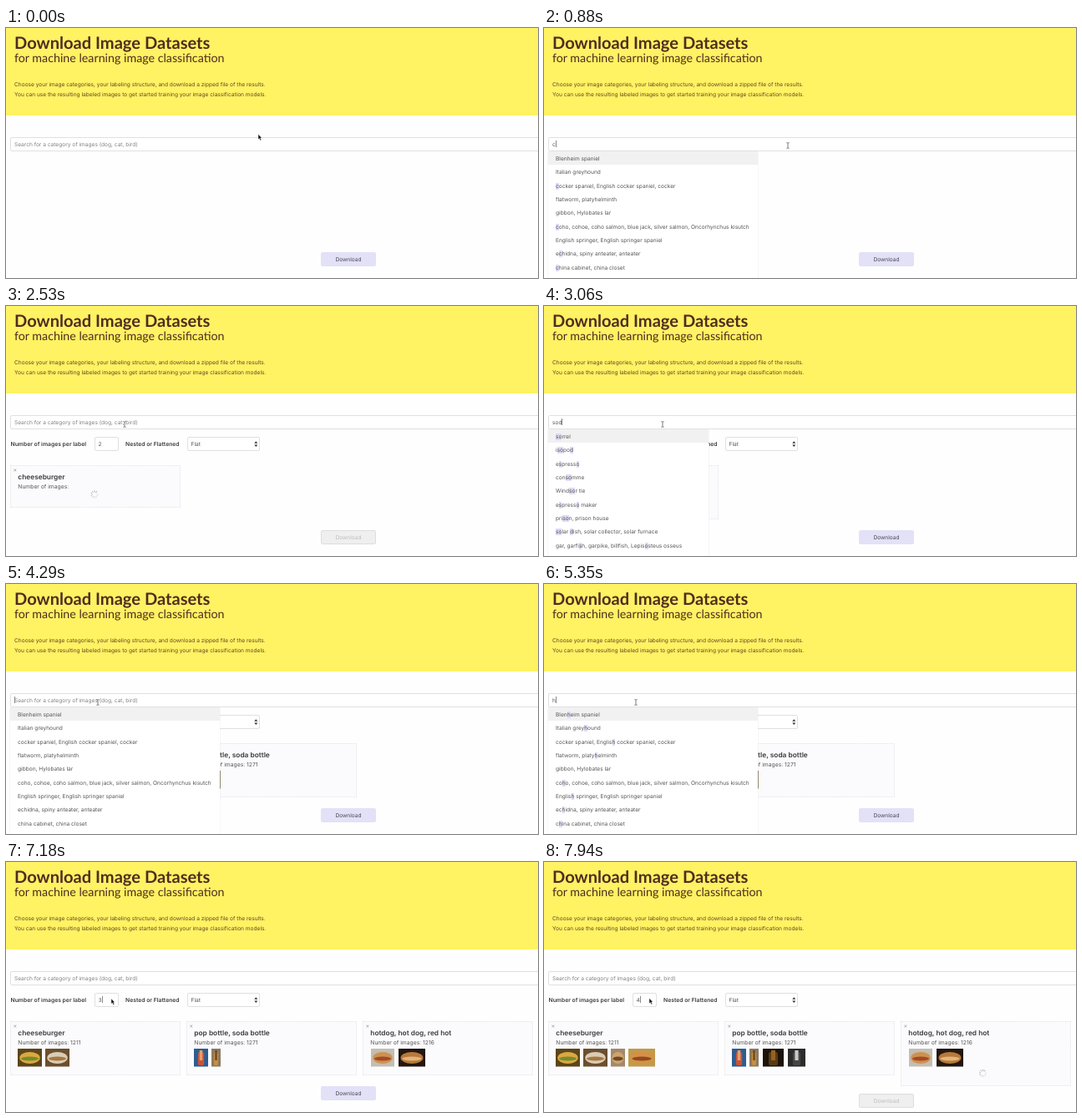
Animation of 637x300 px, one loop 8 s. Source, as an HTML page:

```html
<!DOCTYPE html>
<html lang="en">
<head>
<meta charset="utf-8">
<title>Download Image Datasets</title>
<style>
html, body { margin: 0; width: 100%; height: 100%; overflow: hidden; background: #fefefe; }
#stage { position: relative; width: 637px; height: 300px; overflow: hidden; background: #fefefe;
  font: 6.58px/16px Inter, sans-serif; color: #555; text-rendering: geometricPrecision; }
#stage div, #stage svg { position: absolute; box-sizing: border-box; white-space: pre; }
#stage svg { left: 0; top: 0; }
.head { background: #fff263; }
.field { background: #fff; border: 1px solid #e0e0e0; border-radius: 2px; }
.card { background: #fbfbfd; border: 1px dotted #e4e4e9; }
#stage .list { left: 5px; top: 148px; background: #fff; box-shadow: 0 1px 1px #ccc; }
#stage .list p { margin: 0; padding: 0 10px 0 9px; height: 16.35px; line-height: 18px; }
.list p:first-child { background: #f1f1f1; }
mark { background: #dddbf5; color: inherit; }
i { display: inline-block; width: 0; height: 8px; border-left: 1px solid #888; margin-right: -1px; vertical-align: -1.5px; }
</style>
</head>
<body>
<div id="stage"></div>
<script>
const stage = document.getElementById('stage');
const LOOP = 8000, MORE = 7300;

const common = ['Blenheim spaniel', 'Italian greyhound', 'cocker spaniel, English cocker spaniel, cocker',
  'flatworm, platyhelminth', 'gibbon, Hylobates lar',
  'coho, cohoe, coho salmon, blue jack, silver salmon, Oncorhynchus kisutch',
  'English springer, English springer spaniel', 'echidna, spiny anteater, anteater', 'china cabinet, china closet',
  'chain mail'];
const cheese = ['cheeseburger', 'cheetah, chetah, Acinonyx jubatus'];
const che = ['chest', 'chime, bell, gong', ...cheese, 'echidna, spiny anteater, anteater', 'bleach, chemical jar'];
const so = ['sorrel', 'isopod', 'espresso', 'consomme', 'Windsor tie', 'espresso maker', 'prison, prison house',
  'solar dish, solar collector, solar furnace', 'gar, garfish, garpike, billfish, Lepisosteus osseus',
  'spiny lobster, langouste, rock lobster, crawfish, crayfish'];
const soda = ['pop bottle, soda bottle'], hotdog = ['hotdog, hot dog, red hot'];

// time, typed text, open suggestion list
const typing = [[0, '', null], [355, '', common], [880, 'c', common], [960, 'ch', common], [1060, 'che', che],
  [1180, 'chee', cheese], [2060, '', null], [2580, '', common], [2820, 's', common], [2940, 'so', common],
  [3000, 'so', so], [3060, 'sod', so], [3180, 'soda', soda], [3600, '', null], [4290, '', common],
  [5290, 'h', common], [5410, 'ho', common], [5530, 'hot', [...hotdog, 'photocopier']], [5650, 'hotd', hotdog],
  [6150, '', null]];
const caretOff = [[710, 880], [1530, 2060], [3200, 3600], [4650, 5000], [5880, 6150]];

const pointer = [[0, 302, 127.5], [60, 302, 127.5], [310, 292, 141], [1480, 292, 141], [1760, 192, 155.5],
  [2000, 110, 156], [2120, 110, 156], [2480, 142, 142], [3130, 142, 142], [3500, 112, 156], [3640, 112, 156],
  [4120, 110, 142], [5820, 110, 142], [6080, 92, 156], [6170, 92, 156], [6290, 80, 155], [6650, 116, 165],
  [6900, 126, 164], [7530, 126, 164], [7940, 126, 163.5], [8000, 126, 163.5]];

// photos: x offset, width, background, main tone, accent
const cards = [
  { x: 5, title: 'cheeseburger', total: 1211, start: 2060, done: 2700, more: 7600, photos: [
    [9, 29, '#5d4519', '#d9a941', '#758c2c'], [42, 29, '#6b4f2f', '#d8cdb6', '#a9763d'],
    [75, 17, '#a3896c', '#d0a469', '#6e4a2a'], [96, 32, '#c29a4a', '#d98f45', '#8d4b23']] },
  { x: 216, title: 'pop bottle, soda bottle', total: 1271, start: 3600, done: 4050, more: 7780, photos: [
    [9, 17, '#2c5d91', '#c9533a', '#e3a06a', 1], [30, 11, '#8c7a60', '#c98f3c', '#69431f', 1],
    [46, 25, '#1c130a', '#5a3a16', '#95631f', 1], [76, 21, '#2b2b2b', '#454545', '#c9c9c9', 1]] },
  { x: 427, title: 'hotdog, hot dog, red hot', total: 1216, start: 6150, done: 6700, more: Infinity, photos: [
    [10, 28, '#c5bdb2', '#cb934f', '#a94728'], [43, 32, '#23160e', '#b8793c', '#e2b578']] }
];

const clamp = v => Math.max(0, Math.min(1, v));
const mix = (a, b, k) => `rgb(${a.map((v, i) => Math.round(v + (b[i] - v) * k))})`;
const box = (cls, x, y, w, h, css = '') =>
  `<div class="${cls}" style="left:${x}px;top:${y}px;width:${w}px;height:${h}px;${css}"></div>`;
// y is the middle of the capitals
const text = (x, y, s, css = '') => `<div style="left:${x}px;top:${y - 8}px;${css}">${s}</div>`;

function pointerAt(t) {
  const n = pointer.findIndex(p => p[0] > t), [t0, x0, y0] = pointer[n - 1], [t1, x1, y1] = pointer[n];
  const u = (t - t0) / (t1 - t0), k = u * u * (3 - 2 * u);
  return [x0 + (x1 - x0) * k, y0 + (y1 - y0) * k];
}

// marks the typed letters in order, joining neighbours
function highlight(s, query) {
  let n = 0;
  return [...s].map(c => n < query.length && c === query[n] ? (n++, `<mark>${c}</mark>`) : c)
    .join('').replaceAll('</mark><mark>', '');
}

function spinner(x, y, t) {
  let s = '';
  for (let k = 0; k < 10; k++)
    s += `<path d="M0-2.6V-4.6" transform="translate(${x} ${y}) rotate(${k * 36 + Math.floor(t / 60) * 36})"
      stroke="#888" stroke-width=".9" opacity="${.2 + k * .07}"/>`;
  return s;
}

function photo(left, [dx, w, back, main, accent, tall]) {
  const x = left + dx, c = x + w / 2;
  const shapes = tall
    ? `<rect x="${c - w * .22}" y="228" width="${w * .44}" height="16" rx="2" fill="${main}"/>
       <rect x="${c - w * .1}" y="226" width="${w * .2}" height="12" fill="${accent}"/>`
    : `<ellipse cx="${c}" cy="235" rx="${w * .42}" ry="7" fill="${main}"/>
       <ellipse cx="${c}" cy="236" rx="${w * .36}" ry="2.4" fill="${accent}"/>`;
  return `<rect x="${x}" y="224" width="${w}" height="21.5" fill="${back}"/>${shapes}`;
}

function cardView(c, t) {
  if (t < c.start) return '';
  const ready = t >= c.done, adding = t >= MORE && t < c.more;
  const shown = !ready ? [] : t >= c.more ? c.photos : c.photos.slice(0, 2);
  const art = shown.map(p => photo(c.x, p)).join('') +
    (!ready ? spinner(c.x + 101, 226, t) : adding ? spinner(c.x + 98.5, 253.5, t) : '');
  return box('card', c.x, 191, 204, !ready ? 51 : adding ? 78 : 65) +
    text(c.x + 3.5, 197, '×', 'font-size:7px;color:#999') +
    text(c.x + 9.3, 206, c.title, 'font-size:8.35px;font-weight:600;color:#3c3c3c') +
    text(c.x + 9.3, 217, 'Number of images: ' + (ready ? c.total : ''), 'font-size:6.75px') +
    `<svg width="637" height="300">${art}</svg>`;
}

function button(t) {
  let dim = 0;
  for (const c of cards)
    for (const [a, b] of [[c.start, c.done], [MORE, c.more]])
      if (t >= a) dim = Math.max(dim, t < b ? clamp((t - a) / 400) : clamp((b - a) / 400) * clamp(1 - (t - b) / 130));
  const y = t >= MORE ? 277.5 : 268.5, fade = dim * dim;
  return box('', 377, y, 66, 17.5, `border-radius:2px;background:${mix([227, 225, 247], [239, 239, 239], fade)};
      border:1px solid ${mix([227, 225, 247], [222, 222, 222], fade)}`) +
    text(377, y + 9, 'Download', `width:66px;text-align:center;color:${mix([72, 72, 80], [190, 190, 190], dim)}`);
}

function settings(t) {
  if (t < 2060) return '';
  const count = t < 7000 ? 2 : t < MORE ? 3 : 4, bold = 'font-size:6.8px;font-weight:600;color:#3c3c3c';
  return text(5.5, 165.7, 'Number of images per label', bold) + box('field', 106, 157, 29, 17) +
    text(110.5, 165.7, count + (t > 6750 ? '<i></i>' : '')) +
    text(143, 165.7, 'Nested or Flattened', bold) + box('field', 217, 157, 87, 17) + text(221.5, 165.7, 'Flat') +
    '<svg width="637" height="300"><path d="M297.3 164.8l2-2.6 2 2.6zM297.3 166.4l2 2.6 2-2.6z" fill="#333"/></svg>';
}

function search(t) {
  const [, typed, list] = typing.findLast(s => s[0] <= t);
  const caret = list && !caretOff.some(([a, b]) => t >= a && t < b) ? '<i></i>' : '';
  const body = typed ? typed + caret : caret + '<span style="color:#828282">Search for a category of images (dog, cat, bird)</span>';
  return box('field', 5, 131, 650, 17) + text(10, 139.6, body) +
    (list ? `<div class="list">${list.map(s => `<p>${highlight(s, typed)}</p>`).join('')}</div>` : '');
}

function mouse(t) {
  const [x, y] = pointerAt(t);
  const beam = (y > 131 && y < 148) || (y > 157 && x > 106 && x < 124);
  const shape = beam
    ? '<path d="M-1.6-3.4Q0-3.4 0-2.6Q0-3.4 1.6-3.4M0-2.6V2.6M-1.6 3.4Q0 3.4 0 2.6Q0 3.4 1.6 3.4" fill="none" stroke="#444" stroke-width=".7"/>'
    : '<path d="M0 0V6.2L1.4 5L2.5 7.4L3.6 6.9L2.6 4.6H4.4Z" fill="#111" stroke="#fff" stroke-width=".4"/>';
  return `<svg width="637" height="300"><g transform="translate(${x} ${y})">${shape}</g></svg>`;
}

const header = box('head', 0, 0, 637, 105) +
  text(10, 18.2, 'Download Image Datasets', 'font:700 20.1px/16px Lato,sans-serif;color:#4f2c20') +
  text(10, 37.2, 'for machine learning image classification', 'font:14.25px/16px Lato,sans-serif;color:#4f2c20') +
  text(10, 68, 'Choose your image categories, your labeling structure, and download a zipped file of the results.', 'color:#5c4a24') +
  text(10, 79.5, 'You can use the resulting labeled images to get started training your image classification models.', 'color:#5c4a24');

function draw(now) {
  const t = now % LOOP;
  stage.innerHTML = header + settings(t) + cards.map(c => cardView(c, t)).join('') + button(t) + search(t) + mouse(t);
  requestAnimationFrame(() => draw(performance.now()));
}
draw(0);
</script>
</body>
</html>
```
